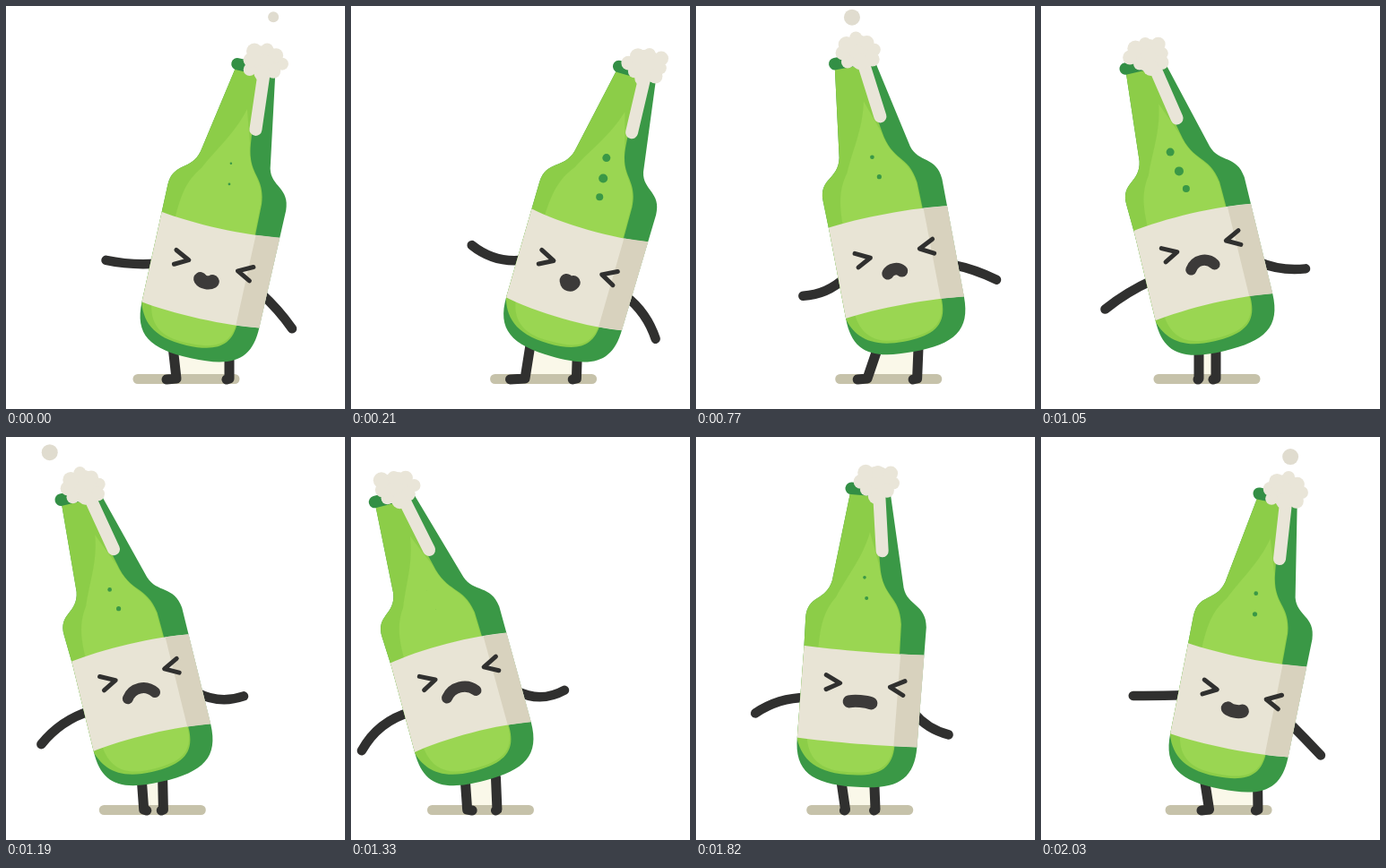
Recreate the animation shown at these times as an HTML page with a canvas. Size 378x450 px, loop 2.1 s.

```html
<!DOCTYPE html>
<html lang="en">
<head>
<meta charset="utf-8">
<title>Dancing bottle</title>
<style>
html, body { margin: 0; width: 100%; height: 100%; overflow: hidden; background: #fff; }
canvas { display: block; }
</style>
</head>
<body>
<canvas id="stage" width="378" height="450"></canvas>
<script>
const ctx = document.getElementById('stage').getContext('2d');
const LOOP = 2100, STEP = 70, BEAT = 420, TAU = Math.PI * 2;
const INK = '#30302f', FOAM = '#e9e5d8', DARK = '#3a9846';

// Outlines in bottle space: origin at the middle of the label's lower edge.
const GLASS = 'M -67 -100 L -67 -134 C -66 -160 -45 -154 -39 -178 L -20 -278 L 25 -278 '
  + 'L 41 -176 C 46 -156 67 -160 68 -134 L 67 0 C 67 38 47 50 0 50 C -47 50 -67 38 -67 0 Z';
const LIT = 'M -90 0 L -90 -290 L 5 -290 L 14 -198 C 18 -162 37 -168 40 -135 '
  + 'L 42 0 C 42 28 25 37 -8 37 C -48 37 -62 20 -68 -2 Z';
const GLOW = 'M 2 -235 C -6 -205 -22 -185 -34 -160 C -48 -142 -50 -125 -51 -100 L -56 0 '
  + 'C -52 26 -34 35 -6 34 C 25 34 40 26 41 0 L 39 -135 C 36 -166 18 -162 13 -198 Z';

let phase, sway, pose;

// Mean plus cosine and sine parts of the first, second, ... harmonic.
function wave(mean, ...parts) {
  return parts.reduce((sum, p, i) => {
    const a = phase * (1 + (i >> 1));
    return sum + p * (i % 2 ? Math.sin(a) : Math.cos(a));
  }, mean);
}

function setPose(t) {
  phase = t / LOOP * TAU;
  sway = wave(-1, 14.8, 6.6, 0.7, 1.9, -2, -1.6);
  const a = sway * Math.PI / 180;
  pose = {
    x: wave(198.8, 15.8, 56.2, 6.2, -8.2, -3.8, -2.4),
    y: wave(339, 4, 1, 1.5),
    bend: wave(-9, 7.5, 8),
    cos: Math.cos(a), sin: Math.sin(a)
  };
}

function place(x, y) {
  const k = Math.max(0, -y - 50) / 230;
  const bx = x + pose.bend * k * k;
  return [pose.x + bx * pose.cos - y * pose.sin, pose.y + bx * pose.sin + y * pose.cos];
}

function trace(text) {
  const parts = text.split(' ');
  const pts = n => {
    const out = [];
    while (n--) out.push(...place(+parts.shift(), +parts.shift()));
    return out;
  };
  ctx.beginPath();
  while (parts.length) {
    const cmd = parts.shift();
    if (cmd === 'M') ctx.moveTo(...pts(1));
    else if (cmd === 'L') ctx.lineTo(...pts(1));
    else if (cmd === 'C') ctx.bezierCurveTo(...pts(3));
    else ctx.closePath();
  }
}

function fill(text, color) {
  trace(text);
  ctx.fillStyle = color;
  ctx.fill();
}

function pen(width, color) {
  ctx.lineWidth = width;
  ctx.strokeStyle = color;
  ctx.stroke();
}

function stroke(text, width, color) {
  trace(text);
  pen(width, color);
}

function line(...pts) {
  ctx.beginPath();
  for (let i = 0; i < pts.length; i += 2) ctx.lineTo(pts[i], pts[i + 1]);
}

function dot(x, y, r, color) {
  if (r <= 0) return;
  ctx.beginPath();
  ctx.arc(x, y, r, 0, TAU);
  ctx.fillStyle = color;
  ctx.fill();
}

function drawLegs() {
  const hipL = pose.x + wave(-24, -7, -14);
  const hipR = pose.x + wave(17, 6, -7, 0, 0, 9);
  const footL = hipL + wave(-3, 2, -10, 5);
  const footR = hipR + wave(0, 0, -2);
  const mid = pose.x + wave(-8, -4, -18, -4);

  line(hipL, 382, footL, 412, footR, 412, hipR, 382);
  ctx.fillStyle = '#faf8e9';
  ctx.fill();
  line(mid - 54, 416.5, mid + 54, 416.5);
  pen(11, '#c6c2aa');
  line(hipL, 380, footL, 416, footL + wave(-6, -5, -11), 417);
  pen(11, INK);
  line(hipR, 380, footR, 416, footR + wave(-3, 0, -2), 417);
  pen(11, INK);
}

// The hand is given relative to the bottle; sag bows the arm downwards.
function drawArm(shoulder, dx, dy, sag) {
  const [sx, sy] = place(...shoulder);
  const hx = pose.x + dx, hy = pose.y + dy;
  const k = 2 * sag * Math.sign(dx) / Math.hypot(hx - sx, hy - sy);
  ctx.beginPath();
  ctx.moveTo(sx, sy);
  ctx.quadraticCurveTo((sx + hx) / 2 - k * (hy - sy), (sy + hy) / 2 + k * (hx - sx), hx, hy);
  pen(10.5, INK);
}

function drawArms() {
  drawArm([-60, -45], wave(-113.5, 8, 7), -30 - 2.45 * sway + wave(0, 0, -12), wave(0, 2, 8));
  drawArm([60, -38], 102, -13 + 2.3 * sway + wave(0, 0, 8), wave(1, -2.5, -6));
}

// A band whose edges bow with the lean, as if seen from above or below.
function band(x0, x1, bow, color) {
  fill(`M ${x0} -103 C -30 ${bow - 103} 30 ${bow - 103} ${x1} -103 `
    + `L ${x1} 0 C 30 ${bow} -30 ${bow} ${x0} 0 Z`, color);
}

function drawBottle(beat) {
  fill(GLASS, DARK);
  ctx.save();
  trace(GLASS);
  ctx.clip();
  fill(LIT, '#8ccd48');
  fill(GLOW, '#9ad652');
  const bow = sway * 0.5;
  band(-70, 70, bow, '#e8e4d5');
  const edge = bow * 0.5;
  fill(`M 41 ${edge - 103} L 70 -103 L 70 0 L 41 ${edge} Z`, '#d8d2be');
  ctx.restore();

  // Bubbles swell, then shrink away, once per beat.
  const age = (beat + 210) % BEAT;
  const r = age < 70 ? 2 + age / 23 : 5 - (age - 70) / 58;
  const rise = Math.max(0, 12 - age / 17.5);
  dot(...place(-3, -172 - rise), r * 0.9, DARK);
  dot(...place(0, -149 - rise), r, DARK);
  if (r > 3) dot(...place(2, -128 - rise), r * 0.8, DARK);
  stroke('M -19 -282 L 20 -282', 13.5, '#338f45');
}

function drawFoam(beat) {
  stroke('M 12 -280 L 16 -215', 14, FOAM);
  const [x, y] = place(10, -291);
  const age = (beat + 70) % BEAT;
  if (age <= 140) {
    const rise = 18 + age * 0.34 - age * age * 0.0008;
    dot(x + wave(-10, 20, 22), y - rise, age < 105 ? 9 : 6, '#e0dccf');
  }
  dot(x, y, 18, FOAM);
  for (let i = 0; i < 8; i++) {
    const a = (i + sway / 60) * TAU / 8;
    const d = 15 + 2 * Math.sin(i * 2.4 + beat / BEAT * TAU);
    dot(x + Math.cos(a) * d * 1.2, y + Math.sin(a) * d * 0.9, 7 + i % 3, FOAM);
  }
}

function drawFace() {
  const x = wave(2, 0, -2.5), y = wave(-63, 6.5, 7.5);
  for (const s of [-1, 1]) {
    stroke(`M ${x + s * 44} ${y - 8} L ${x + s * 28} ${y} L ${x + s * 43} ${y + 8}`, 5, INK);
  }
  const sag = wave(-2.5, 5, 3), h = 14.5 + 0.3 * sag;
  const w = Math.max(1, wave(17, -2.5, -5.5) - h / 2);
  const mx = x - 4, end = y + 19 - sag / 2, mid = end + sag * 1.33;
  stroke(`M ${mx - w} ${end} C ${mx - w / 2} ${mid} ${mx + w / 2} ${mid} ${mx + w} ${end}`,
    h, '#3c3a39');
}

function draw(t) {
  const beat = (t + 70) % BEAT;
  setPose(t);
  ctx.fillStyle = '#fff';
  ctx.fillRect(0, 0, 378, 450);
  ctx.lineCap = ctx.lineJoin = 'round';
  drawLegs();
  drawArms();
  drawBottle(beat);
  drawFoam(beat);
  drawFace();
}

const start = performance.now();
function tick() {
  const t = (performance.now() - start) % LOOP;
  draw(Math.floor(t / STEP) * STEP);
  requestAnimationFrame(tick);
}
tick();
</script>
</body>
</html>
```
